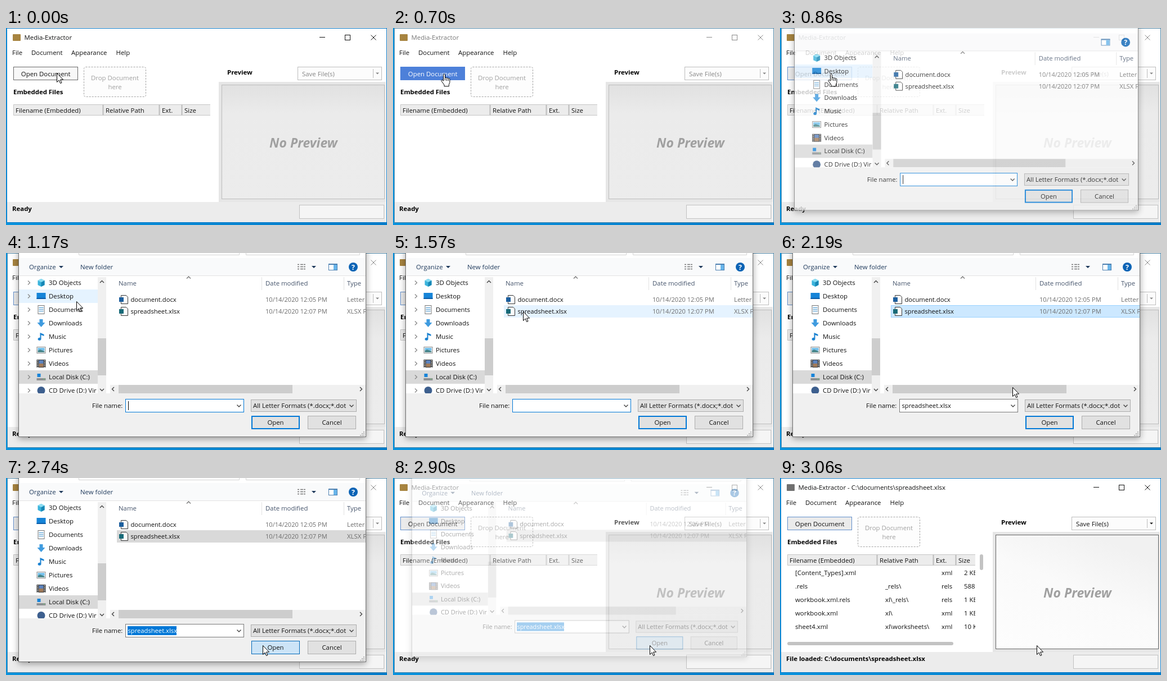
Animation of 677 by 351 pixels, one loop 3.91 s. Source, as an HTML page:

```html
<!DOCTYPE html>
<html lang="en">
<head>
<meta charset="utf-8">
<title>Media-Extractor</title>
<style>
  html, body { margin: 0; width: 100%; height: 100%; overflow: hidden; background: #0088d4; }
  svg { display: block; }
  #stage { width: 677px; height: 351px; }
  text { font: 11.4px "Open Sans", "Noto Sans", sans-serif; white-space: pre; }
</style>
</head>
<body>
<svg id="stage" viewBox="0 0 677 351">
  <defs>
    <linearGradient id="desk"><stop stop-color="#0a93dd"/><stop offset="1" stop-color="#007bc9"/></linearGradient>
    <linearGradient id="idle" x2="0" y2="1">
      <stop stop-color="#e1e1e1"/><stop offset=".25" stop-color="#ebebeb"/><stop offset="1" stop-color="#ececec"/>
    </linearGradient>
    <linearGradient id="loaded" x1="0" y1="1" x2=".6" y2="0">
      <stop stop-color="#fdfdfd"/><stop offset=".6" stop-color="#fafafa"/><stop offset="1" stop-color="#f1f1f1"/>
    </linearGradient>
    <filter id="shadow" x="-10%" y="-10%" width="120%" height="125%">
      <feDropShadow dx="0" dy="3" stdDeviation="6" flood-opacity=".36"/>
    </filter>
  </defs>
  <g id="scene"></g>
</svg>
<script>
const LOOP = 3910, STEP = 7.853; // step length in hundredths of a second
const scene = document.getElementById('scene');

const rect = (x, y, w, h, fill, extra = '') =>
  `<rect x="${x}" y="${y}" width="${w}" height="${h}" fill="${fill}" ${extra}/>`;
const box = (x, y, w, h, fill, stroke, extra = '') =>
  rect(x + .5, y + .5, w - 1, h - 1, fill, `stroke="${stroke}" ${extra}`);
const text = (x, y, s, fill = '#111', extra = '') =>
  `<text x="${x}" y="${y}" fill="${fill}" ${extra}>${s}</text>`;
const bold = (x, y, s) => text(x, y, s, '#000', 'style="font-weight:700"');
const center = (x, y, s, fill, extra = '') => text(x, y, s, fill, `text-anchor="middle" ${extra}`);
const line = (d, stroke, width = 1, extra = '') =>
  `<path d="${d}" fill="none" stroke="${stroke}" stroke-width="${width}" ${extra}/>`;
const shape = (d, fill, extra = '') => `<path d="${d}" fill="${fill}" ${extra}/>`;
const dot = (x, y, r, fill) => `<circle cx="${x}" cy="${y}" r="${r}" fill="${fill}"/>`;
const group = (body, attrs) => `<g ${attrs}>${body}</g>`;
const clip = (x, y, w, h, body) =>
  `<svg x="${x}" y="${y}" width="${w}" height="${h}" viewBox="${x} ${y} ${w} ${h}">${body}</svg>`;
const chevron = (x, y, color = '#444', turn = 0) =>
  line('M-3.5 -2L0 1.5L3.5 -2', color, 1.4, `transform="translate(${x} ${y}) rotate(${turn})"`);
const triangle = (x, y, color, r = 3) => shape(`M${x - r} ${y - r / 2}h${2 * r}l${-r} ${r}z`, color);

// Linear track through [step, ...values] keys
function track(keys, n) {
  const i = keys.findIndex(k => k[0] >= n);
  if (i < 0) return keys.at(-1).slice(1);
  if (i === 0) return keys[0].slice(1);
  const a = keys[i - 1], b = keys[i], u = (n - a[0]) / (b[0] - a[0]);
  return a.slice(1).map((v, j) => v + (b[j + 1] - v) * u);
}
const mix = (a, b, u) =>
  `rgb(${a.map((v, i) => Math.round(v + (b[i] - v) * u))})`;

const POINTER = [[14, 90, 80], [16, 160, 92], [18, 228, 103], [20, 231, 104], [24, 231, 104],
  [26, 291, 148], [28, 413, 239], [30, 449, 273], [33, 456, 298]];
const BUTTON_HOVER = [[4, 0], [7, 1]];
const DIALOG = [[9, 0, .96], [10, .3, .965], [11, .8, .99], [12, .97, .998], [13, 1, 1],
  [35, 1, 1], [36, .9, .99], [37, .35, .965], [38, 0, .96]];
const ARROWS = [[11, 0], [13, 1], [21, 1], [26, 0]];
const COMBO_HOVER = [[28, 0], [30, 1], [31, 1], [34, 0]];

const FILES = [
  ['[Content_Types].xml', '', 'xml', '2 KB'],
  ['.rels', '_rels\\', 'rels', '588 B'],
  ['workbook.xml.rels', 'xl\\_rels\\', 'rels', '1 KB'],
  ['workbook.xml', 'xl\\', 'xml', '1 KB'],
  ['sheet4.xml', 'xl\\worksheets\\', 'xml', '10 KB'],
];

function mainWindow(n) {
  const loaded = n >= 39, active = n < 9 || n >= 38, pressed = n >= 11;
  const left = active ? 2 : 3, ink = active ? '#111' : '#8a8a8a';
  const hover = track(BUTTON_HOVER, n)[0];
  const tableEnd = loaded ? 347 : 363;
  let s = rect(0, 0, 677, 351, 'url(#desk)');
  s += box(left - 1, 0, 678 - left, 347, '#fff', active ? '#0a78c6' : '#4f87a8');

  // Title bar and menu
  s += rect(12, 11, 14, 12, loaded ? '#707070' : '#a78440', 'rx="1"');
  s += text(32.5, 21, 'Media-Extractor' + (loaded ? ' - C:\\documents\\spreadsheet.xlsx' : ''), active ? '#111' : '#777');
  s += line('M557 16.5h10', ink) + box(602, 12, 10, 10, 'none', ink) + line('M648.5 12.5l9 9m0-9l-9 9', ink);
  [[11, 'File'], [45, 'Document'], [116, 'Appearance'], [195.5, 'Help']].forEach(([x, label]) => s += text(x, 48, label));

  // Commands
  s += pressed ? box(13, 69, 115, 24, '#ebebeb', '#628fcb')
    : box(13, 69, 115, 24, mix([248, 248, 248], [77, 128, 217], hover), mix([105, 105, 105], [77, 128, 217], hover));
  s += center(70.7, 86, 'Open Document', pressed ? '#111' : mix([17, 17, 17], [255, 255, 255], hover));
  s += box(138, 69, 111, 54, '#fdfdfd', '#a3a3a3', 'rx="3" stroke-dasharray="3 2"');
  s += center(193.5, 93, 'Drop Document', '#a0a0a0') + center(193.5, 109, 'here', '#a0a0a0');
  s += bold(13, 118, 'Embedded Files') + bold(393, 83, 'Preview');
  const saveInk = loaded ? '#111' : '#858585';
  s += box(518, 69, 150, 24, '#fcfcfc', '#bdbdbd') + line('M652.5 73v16', '#bdbdbd');
  s += text(526, 86, 'Save File(s)', saveInk) + triangle(660, 81, saveInk);

  // Table
  let table = rect(13, 136, 360, 20, '#ececec') + line('M380 136.5H13.5V155.5H380', '#c6c6c6');
  table += line('M172.5 137v18M272.5 137v18M312.5 137v18', '#bbb', 2);
  [[17, 'Filename (Embedded)'], [177, 'Relative Path'], [277, 'Ext.'], [317, 'Size']]
    .forEach(([x, label]) => table += text(x, 151, label));
  if (loaded) {
    FILES.forEach((row, r) => row.forEach((cell, c) =>
      table += text([27, 187, 287, 327][c], 173 + 24 * r, cell)));
    s += rect(355, 136, 6, 28, '#c3c3c3', 'rx="3"') + rect(13, 292, 295, 6, '#c3c3c3', 'rx="3"');
  }
  s += clip(13, 130, tableEnd - 13, 155, table);

  // Preview and status bar
  s += rect(378, 96, 297, 215, '#e6e6e6') + rect(left, 310, 675 - left, 36, '#ececec');
  s += box(383, 101, 290, 204, loaded ? 'url(#loaded)' : 'url(#idle)', loaded ? '#666' : '#bdbdbd');
  s += center(528.5, 213, 'No Preview', '#a0a0a0', 'style="font-size:23px;font-weight:700;font-style:italic"');
  s += bold(11, 326, loaded ? 'File loaded: C:\\documents\\spreadsheet.xlsx' : 'Ready');
  return s + box(521, 315, 151, 25, '#f5f5f5', '#c2c2c2');
}

// Icons are drawn in a 16 by 16 cell
const page = box(2, 0, 12, 16, '#fff', '#777');
const TREE = [
  ['3D Objects', shape('M8 1l6 3v8l-6 3-6-3V4z', '#3bb4dc') + shape('M8 7l6-3v8l-6 3z', '#1787b5') + shape('M8 1l6 3-6 3-6-3z', '#8adcf2')],
  ['Desktop', rect(0, 2, 16, 11, '#1684d8') + rect(0, 11, 16, 2, '#0b5ca8')],
  ['Documents', page + line('M4 4.5h8M4 7.5h8M4 10.5h8', '#3d92cf')],
  ['Downloads', shape('M5 1h6v6h4l-7 8-7-8h4z', '#3f9bdf')],
  ['Music', shape('M6 1l7 3v3L8 5v7a3 2.5 0 1 1-2-2z', '#1b82d1')],
  ['Pictures', box(0, 2, 16, 12, '#fff', '#888') + rect(2, 4, 12, 5, '#75c0ea') + shape('M2 12V9l4-2 8 3v2z', '#48858a')],
  ['Videos', rect(0, 1, 16, 14, '#333') + rect(4, 2, 8, 12, '#5c83bd') + rect(4, 8, 8, 6, '#a17a58') +
    line('M2 2v13M14 2v13', '#ddd', 2, 'stroke-dasharray="1.5 1.5"')],
  ['Local Disk (C:)', rect(1, 2, 6, 6, '#1784d9') + rect(0, 10, 16, 4, '#8c8f92') + rect(12, 11, 2, 1, '#6be36b')],
  ['CD Drive (D:) Vir', dot(8, 8, 7, '#3d5f8e')],
];

function tree(n) {
  const [arrows] = track(ARROWS, n);
  let s = rect(23, 209, 140, 24, '#d9d9d9');
  if (n >= 11 && n < 16) s += rect(23, 65, 140, 24, '#e5f3ff');
  TREE.forEach(([label, icon], i) => {
    const y = 53 + 24 * i;
    s += group(icon, `transform="translate(54.5 ${y - 8})"`) + text(76, y + 4, label);
    s += group(chevron(41, y, '#8c8c8c', -90), `opacity="${arrows}"`);
  });
  return clip(23, 43, 140, 207, s) + rect(163, 43, 15, 207, '#f0f0f0') +
    rect(163, 152, 15, 66, '#cdcdcd') + chevron(170.5, 51, '#444', 180) + chevron(170.5, 244);
}

function fileList(n) {
  let s = chevron(324.5, 43.5, '#777', 180) + line('M454.5 43v23M600.5 43v23', '#e2e2e2');
  [[200, 'Name'], [461, 'Date modified'], [606, 'Type']].forEach(([x, label]) => s += text(x, 58, label, '#45546b'));
  if (n >= 34) s += rect(197, 93, 443, 22, '#d9d9d9');
  else if (n >= 22) s += box(197, 93, 450, 22, '#cce8ff', '#99d1ff');
  else if (n >= 17) s += rect(197, 93, 443, 22, '#e5f3ff');
  [['document.docx', '10/14/2020 12:05 PM', 'Letter', '#1d5f9e'],
   ['spreadsheet.xlsx', '10/14/2020 12:07 PM', 'XLSX File', '#176a78']].forEach(([name, date, type, color], i) => {
    const y = 83 + 21 * i;
    s += shape(`M204.5 ${y - 7.5}h9l3 3v12h-12z`, '#fff', 'stroke="#333"') + rect(201, y - 4, 8, 8, color);
    s += text(221.5, y + 4, name, '#111', 'style="font-size:11.2px"');
    s += text(461, y + 4, date, '#6d6d6d', 'style="font-size:11.1px"') + text(606, y + 4, type, '#6d6d6d');
  });
  s += rect(185, 235, 455, 15, '#f0f0f0') + rect(200, 235, 309, 15, '#cdcdcd');
  s += chevron(190, 242.5, '#444', 90) + chevron(631, 242.5, '#444', -90);
  return clip(184, 40, 455, 210, s);
}

function toolbar(n) {
  let s = rect(24, 9, 615, 31, '#f9fafb') + line('M24 40.5h615', '#e3e3e3');
  if (n >= 12) {
    s += line('M129.5 0V3.5H414.5V0M426.5 0V3.5H628.5V0', '#d4d4d4');
    s += text(41, 29, 'Organize', '#1e395b') + triangle(98, 25, '#1e395b', 4) + text(132, 29, 'New folder', '#1e395b');
    s += line('M518 20.5h16M518 24.5h16M518 28.5h16', '#777', 1.5, 'stroke-dasharray="3 2 5 1"') + triangle(547, 25, '#1e395b', 4);
  }
  s += box(573, 19, 16, 12, '#fff', '#4c7fb0') + rect(573, 19, 16, 2, '#4c7fb0') + rect(582, 21, 6, 9, '#68b5ea');
  return s + dot(617, 25, 8, '#0b63b5') + center(617, 29.5, '?', '#fff', 'style="font-size:12.5px;font-weight:700"');
}

function dialog(n) {
  const chosen = n >= 22, marked = n >= 34, caret = n < 17;
  const [combo] = track(COMBO_HOVER, n);
  let s = rect(22, -160, 618, 488, '#fff', 'filter="url(#shadow)"') + rect(23, 250, 617, 78, '#f0f0f0');
  s += toolbar(n) + tree(n) + fileList(n);

  s += text(153, 276, 'File name:') + box(212, 260, 211, 24, '#fff', chosen ? '#7a7a7a' : '#0078d7') + chevron(414, 272.5);
  if (marked) s += rect(216, 264, 87, 16, '#0078d7');
  if (chosen) s += text(216.5, 276, 'spreadsheet.xlsx', marked ? '#fff' : '#111', 'style="font-size:11.2px"');
  else if (caret) s += rect(217, 264, 1, 16, '#000');

  s += box(435, 261, 188, 22, mix([225, 225, 225], [229, 241, 251], combo), mix([173, 173, 173], [0, 120, 215], combo));
  s += text(439, 276, 'All Letter Formats (*.docx;*.dot') + chevron(614, 272.5);
  if (marked) s += box(436, 290, 86, 24, '#cce4f7', '#0068b8');
  else s += rect(437, 291, 84, 22, n >= 32 ? '#e5f1fb' : '#e1e1e1', 'stroke="#0078d7" stroke-width="2"');
  s += center(479, 306, 'Open') + box(536, 290, 86, 24, '#e1e1e1', '#adadad') + center(579, 306, 'Cancel');
  for (let i = 0; i < 3; i++)
    for (let j = 0; j <= i; j++) s += rect(635 - 3 * j, 318 + 3 * i, 2, 2, '#b5b5b5');
  return s + box(22, -160, 618, 488, 'none', '#6e6e6e');
}

function pointer(n) {
  const [x, y] = track(POINTER, n).map(Math.round);
  const outline = 'stroke="#000" stroke-linejoin="round"';
  const hand = n >= 5 && n < 12;
  const art = hand
    ? shape('M-.5 3.5c0-2 3-2 3 0v6c.4-1.6 2.8-1.4 3 .3c.5-1.3 2.7-1.1 2.8.6c.6-1 2.6-.7 2.6 1v5c0 2-1.6 3.2-1.6 5v2.5h-8.3v-2.5c-1.5-2.2-3-4.4-4.7-6.5c-1.4-2 .9-3.2 2.2-1.8l1 1.2z', '#fff', outline) +
      line('M2.5 10v3.5M5.5 10.5v3.5M8.3 11v3', '#000')
    : shape('M.5 .5v16l3.7-3.5l2.4 5.6l2.4-1l-2.4-5.5h5z', '#fff', outline);
  return group(art, `transform="translate(${x} ${y})"`);
}

function draw(n) {
  const [opacity, scale] = track(DIALOG, n);
  let s = mainWindow(n);
  if (opacity > 0) {
    s += group(dialog(n), `opacity="${opacity}" transform="translate(331 72) scale(${scale}) translate(-331 -72)"`);
  }
  scene.innerHTML = s + pointer(n);
}

let shown = -1;
function tick(now) {
  const hundredths = Math.floor((now % LOOP) / 10);
  const n = Math.ceil((hundredths + 1) / STEP) - 1;
  if (n !== shown) draw(shown = n);
  requestAnimationFrame(tick);
}
tick(performance.now());
</script>
</body>
</html>
```
